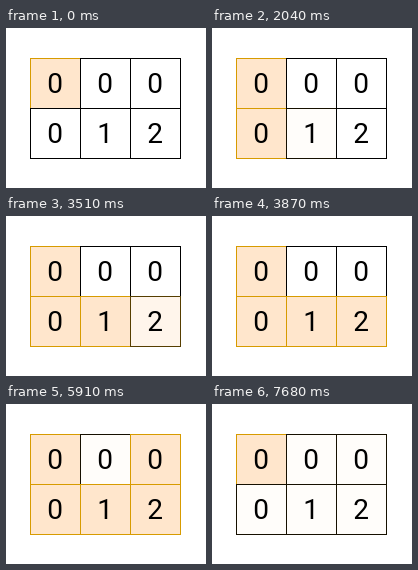
These frames come from a looping animation (200 by 160 pixels, 7740 ms). An HTML page:

```html
<!DOCTYPE html>
<html lang="en">
<head>
<meta charset="utf-8">
<title>Grid traversal</title>
<style>
  html, body { margin: 0; width: 100%; height: 100%; overflow: hidden; background: #fff; }
  svg { display: block; width: 200px; height: 160px; }
  rect { width: 50px; height: 50px; fill: #fff; stroke: #000; }
  .lit { fill: #ffe6cc; stroke: #d79b00; }
  text { font: 28px Roboto, Arial, sans-serif; text-anchor: middle; }

  /* Each cell lights up in ten 60 ms steps; all but the first go dark together. */
  .v1 { animation: v1 7.74s steps(10, start) infinite; }
  .v2 { animation: v2 7.74s steps(10, start) infinite; }
  .v3 { animation: v3 7.74s steps(10, start) infinite; }
  .v4 { animation: v4 7.74s steps(10, start) infinite; }
  .v5 { animation: v5 7.74s steps(10, start) infinite; }
  @keyframes v1 {
    0%, 9.6899% { fill: #fff; stroke: #000; }
    17.4418% { fill: #ffe6cc; stroke: #d79b00; }
    93.0232% { fill: #ffe6cc; stroke: #d79b00; animation-timing-function: steps(9, start); }
    100% { fill: #fffdfa; stroke: #161000; }
  }
  @keyframes v2 {
    0%, 26.3565% { fill: #fff; stroke: #000; }
    34.1085% { fill: #ffe6cc; stroke: #d79b00; }
    93.0232% { fill: #ffe6cc; stroke: #d79b00; animation-timing-function: steps(9, start); }
    100% { fill: #fffdfa; stroke: #161000; }
  }
  @keyframes v3 {
    0%, 43.0232% { fill: #fff; stroke: #000; }
    50.7751% { fill: #ffe6cc; stroke: #d79b00; }
    93.0232% { fill: #ffe6cc; stroke: #d79b00; animation-timing-function: steps(9, start); }
    100% { fill: #fffdfa; stroke: #161000; }
  }
  @keyframes v4 {
    0%, 59.6899% { fill: #fff; stroke: #000; }
    67.4418% { fill: #ffe6cc; stroke: #d79b00; }
    93.0232% { fill: #ffe6cc; stroke: #d79b00; animation-timing-function: steps(9, start); }
    100% { fill: #fffdfa; stroke: #161000; }
  }
  @keyframes v5 {
    0%, 76.3565% { fill: #fff; stroke: #000; }
    84.1085% { fill: #ffe6cc; stroke: #d79b00; }
    93.0232% { fill: #ffe6cc; stroke: #d79b00; animation-timing-function: steps(9, start); }
    100% { fill: #fffdfa; stroke: #161000; }
  }
</style>
</head>
<body>
<svg viewBox="0 0 200 160">
  <!-- Later cells cover the shared borders of earlier ones. -->
  <rect class="lit" x="24.5" y="30.5"/>
  <rect class="v5" x="74.5" y="30.5"/>
  <rect class="v4" x="124.5" y="30.5"/>
  <rect class="v1" x="24.5" y="80.5"/>
  <rect class="v2" x="74.5" y="80.5"/>
  <rect class="v3" x="124.5" y="80.5"/>
  <text x="49" y="65">0</text>
  <text x="99" y="65">0</text>
  <text x="149" y="65">0</text>
  <text x="49" y="115">0</text>
  <text x="99" y="115">1</text>
  <text x="149" y="115">2</text>
</svg>
</body>
</html>
```
